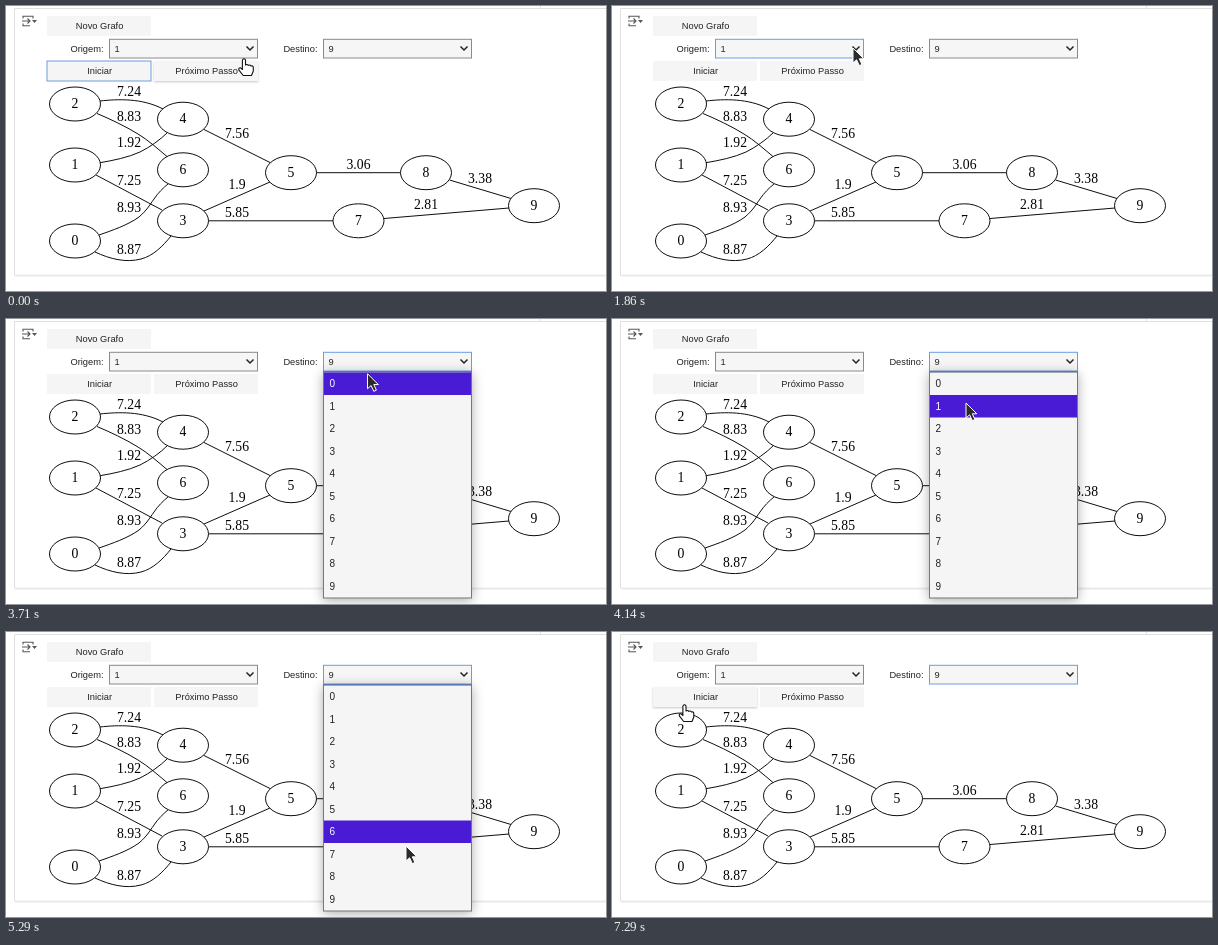
Recreate the animation shown at these times as an HTML page. Size 600 px wide and 285 px high, loop 8000 ms.

```html
<!DOCTYPE html>
<html lang="pt">
<head>
<meta charset="utf-8">
<style>
  html, body { margin: 0; width: 100%; height: 100%; overflow: hidden; background: #fff; }
  svg { display: block; width: 600px; height: 285px; }
  text { fill: #222; }
  .ui { font: 9.3px "Liberation Sans", Arial, sans-serif; }
  .graph { font: 13.7px "Liberation Serif", Times, serif; text-anchor: middle; }
  .graph text { fill: #000; }
  .graph path { fill: none; stroke: #000; stroke-width: .95; }
  .graph ellipse { fill: #fff; stroke: #000; stroke-width: .95; }
  .mid { text-anchor: middle; }
  .end { text-anchor: end; }
  .hover { filter: drop-shadow(0 1px 1px rgba(0, 0, 0, .22)); }
  #menu { font-size: 10px; }
  .panel { filter: drop-shadow(0 2px 6px rgba(0, 0, 0, .32)); }
</style>
</head>
<body>
<svg viewBox="0 0 600 285">
  <g fill="none" stroke="#e0e0e0">
    <path d="M600 2.5H8.5V269.2H600M534.5 0V2"/>
    <path d="M9 270.5H600" stroke="#f4f4f4"/>
  </g>
  <g fill="none" stroke="#555" stroke-width="1.1">
    <path d="M17 12.5V10.3H27V12.5M17 17.5V19.8H24M16 15H24M21.5 12.5L24 15L21.5 17.5"/>
    <path d="M26 14H31L28.5 17Z" fill="#555" stroke="none"/>
  </g>
  <g id="graph" class="graph"></g>
  <g id="form" class="ui"></g>
  <g id="addCell" class="ui">
    <path id="addLine" d="M23 273.5H600" stroke="#999"/>
    <g id="addButton">
      <rect x="534" y="264.5" width="48" height="18" rx="3" fill="#fff" stroke="#bbb"/>
      <text class="mid" x="558" y="277">+ Code</text>
    </g>
  </g>
  <g id="menu" class="ui"></g>
  <path id="arrow" d="M0 0V15L3.6 11.8L6.3 17.6L8.9 16.4L6.3 10.8H10.8Z" fill="#2b2b2b" stroke="#fff"/>
  <path id="hand" d="M-1.6 1Q0 -1.4 1.5 1V6Q3.2 4.8 4.3 6.4Q6 5.4 7 7Q9 6.3 9.3 8.6V12L7.5 16.5H-.8L-5.2 10.8Q-5.4 8.4 -3.4 8.8L-1.6 10.5Z"
        fill="#fff" stroke="#111" stroke-width="1.1" stroke-linejoin="round"/>
</svg>
<script>
const $ = id => document.getElementById(id);
const text = (x, y, s, cls = '') => `<text x="${x}" y="${y}" class="${cls}">${s}</text>`;
const BLUE = '#6a9ee4';

const nodes = [[69, 235], [69, 159], [69, 98], [177, 214.8], [177, 113.2],
               [285, 166.7], [177, 163.8], [352.5, 214.8], [420, 166.7], [528, 199.7]];
const edges = [
  ['7.24', 123, 90, 'M94 95C112 93 136 92 157 103'],
  ['8.83', 123, 115, 'M91 107.5C104 113 119 120 132 128C142 134 152 143 161 150.5'],
  ['1.92', 123, 141, 'M94 156.7C107 154.5 122 151.5 134 146C144 141 154 134 161.5 126.5'],
  ['7.25', 123, 179, 'M90 169L156 204'],
  ['8.93', 123, 206, 'M93 229C106 224.5 122 219 133 211C141 204 143 200 148 193C152 187 157 182 162.5 177.5'],
  ['8.87', 123, 248, 'M89 246C104 253 120 257 135 253C147 250 157 240 165 230'],
  ['7.56', 231, 132, 'M198 123.5L264 156.5'],
  ['1.9', 231, 183, 'M198 205L264 176'],
  ['5.85', 231, 211, 'M203 214.8H327'],
  ['3.06', 352.5, 163, 'M310.5 166.7H394.5'],
  ['3.38', 474, 177, 'M443.5 174L505 192.5'],
  ['2.81', 420, 203, 'M378 212.5L503 202']
];
$('graph').innerHTML =
  edges.map(([label, x, y, d]) => `<path d="${d}"/>` + text(x, y - .3, label)).join('') +
  nodes.map(([x, y], i) => `<ellipse cx="${x}" cy="${y}" rx="25.5" ry="17"/>` + text(x, y + 4, i)).join('');

const button = (id, x, y, label) =>
  `<rect id="${id}" x="${x}" y="${y}" width="104" height="20" fill="#f5f5f5"/>` + text(x + 52.6, y + 13, label, 'mid');
const select = (id, x, label, value) => text(x - 5.5, 46, label, 'end') +
  `<rect id="${id}" x="${x + .5}" y="33.3" width="148" height="18.7" fill="#f6f6f6"/>` + text(x + 5.5, 46, value) +
  `<path d="M${x + 137.5} 40.5l3.5 3.5l3.5 -3.5" fill="none" stroke="#222" stroke-width="1.5"/>`;
$('form').innerHTML =
  button('novo', 41, 10, 'Novo Grafo') + button('iniciar', 41, 55, 'Iniciar') +
  button('passo', 148, 55, 'Próximo Passo') +
  select('origem', 103, 'Origem:', 1) + select('destino', 317, 'Destino:', 9);

const ROW = 22.5;
const rowTop = i => 53.5 + ROW * i;
function menu(x, picked) {
  let out = `<rect class="panel" x="${x + .5}" y="53" width="148" height="226" fill="#f5f5f5" stroke="#777"/>
    <path d="M${x} 52.7h149" stroke="#4b6fb8"/>
    <rect x="${x + 1}" y="${rowTop(picked)}" width="147" height="${ROW}" fill="#4a1bd4"/>`;
  for (let i = 0; i < 10; i++)
    out += `<text x="${x + 6.5}" y="${rowTop(i) + 14.7}"${i === picked ? ' style="fill:#fff"' : ''}>${i}</text>`;
  return out;
}

// Pointer stops: tick, x, y.
const stops = [[0, 238, 53], [1, 238, 53], [4, 235, 41], [11, 235, 41], [13, 241, 42], [14, 241, 42],
  [16, 364, 45], [25, 364, 45], [29, 354, 84], [32, 362, 50], [36, 362, 50], [37, 400, 214],
  [39, 402, 262], [42, 402, 262], [43, 392, 250], [46, 220, 142], [49, 80, 74], [51, 72.5, 73], [56, 72.5, 73]];
function pointer(tick) {
  const n = stops.findIndex(s => s[0] > tick);
  const [a, b] = [stops[n - 1], stops[n]];
  const k = (tick - a[0]) / (b[0] - a[0]);
  return [a[1] + (b[1] - a[1]) * k, a[2] + (b[2] - a[2]) * k];
}

const show = (id, on) => $(id).style.display = on ? '' : 'none';
const within = (tick, from, to) => tick >= from && tick < to;
let last = -1;

function draw(tick) {
  const [x, y] = pointer(tick);
  const isHand = tick < 2 || tick >= 50;
  for (const id of ['arrow', 'hand']) $(id).setAttribute('transform', `translate(${x} ${y})`);
  show('hand', isHand);
  show('arrow', !isHand);

  $('iniciar').setAttribute('stroke', tick < 7 ? BLUE : 'none');
  $('origem').setAttribute('stroke', within(tick, 7, 18) ? BLUE : '#8a8a8a');
  $('destino').setAttribute('stroke', tick >= 18 ? BLUE : '#8a8a8a');
  $('passo').classList.toggle('hover', tick < 3);
  $('iniciar').classList.toggle('hover', tick >= 50);

  const row = Math.max(0, Math.min(9, Math.floor((y - 58.5) / ROW)));
  $('menu').innerHTML = within(tick, 7, 12) ? menu(103, 1)
    : within(tick, 18, 42) ? menu(317, tick < 26 ? 9 : row) : '';

  show('addCell', within(tick, 42, 44));
  $('addButton').setAttribute('opacity', tick === 42 ? .12 : .4);
}

function loop() {
  const tick = Math.floor((performance.now() % 8000 + 5) * 7 / 1000) % 56;
  if (tick !== last) draw(last = tick);
  requestAnimationFrame(loop);
}
loop();
</script>
</body>
</html>
```
